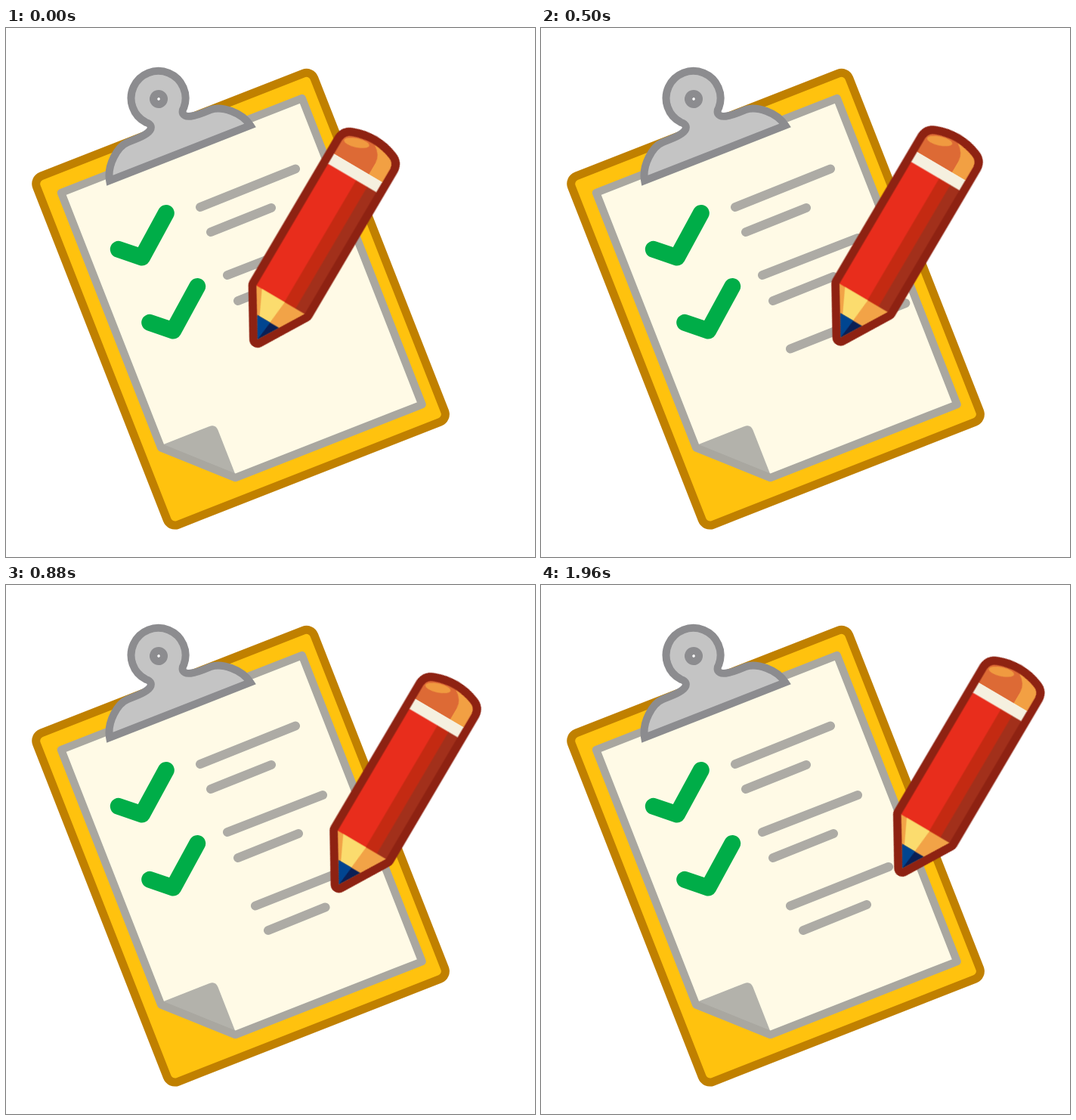
Recreate the animation shown at these times as an HTML page without scripts. Size 700 by 700 pixels, loop 2 s.

```html
<!DOCTYPE html>
<html lang="en">
<head>
<meta charset="utf-8">
<title>Checklist</title>
<style>
html, body { margin: 0; width: 100%; height: 100%; overflow: hidden; background: #fff; }
svg { display: block; width: 100vw; height: 100vh; }
.rule { fill: none; stroke: #adaba5; stroke-width: 12; stroke-linecap: round; }
.tick { fill: none; stroke: #00ad48; stroke-width: 22; stroke-linecap: round; stroke-linejoin: round; }
.long { stroke-dasharray: 174 400; animation: long 2s linear infinite; }
.short { stroke-dasharray: 84 400; animation: short 2s linear infinite; }
.pencil { animation: write 2s infinite; }

@keyframes write {
  0% { transform: translate(0, 0); animation-timing-function: cubic-bezier(.32, 0, .67, .15); }
  10.5% { transform: translate(56px, -23.5px); animation-timing-function: cubic-bezier(.33, .85, .68, 1); }
  20.833% { transform: translate(115.5px, -42.5px); animation-timing-function: cubic-bezier(.45, 0, .55, 1); }
  29% { transform: translate(17.5px, 33px); animation-timing-function: cubic-bezier(.32, 0, .67, 0); }
  37.5% { transform: translate(39.5px, 23px); animation-timing-function: cubic-bezier(.33, .4, .4, 1); }
  54.1%, 100% { transform: translate(145.3px, -37.2px); }
}
@keyframes long {
  0% { stroke-dashoffset: 173.9; opacity: 0; }
  2% { stroke-dashoffset: 150; opacity: 0; }
  2.01% { stroke-dashoffset: 150; opacity: 1; }
  10.5% { stroke-dashoffset: 45; }
  18.75%, 20.833% { stroke-dashoffset: 0; }
  29% { stroke-dashoffset: 42; }
  100% { stroke-dashoffset: 44; opacity: 1; }
}
@keyframes short {
  0%, 31% { stroke-dashoffset: 83.9; opacity: 0; }
  31.01% { stroke-dashoffset: 76; opacity: 1; }
  37.5% { stroke-dashoffset: 40; }
  45.8%, 100% { stroke-dashoffset: 0; opacity: 1; }
}
</style>
</head>
<body>
<svg viewBox="0 0 700 700">
  <!-- board, sheet and clip share one tilt -->
  <g transform="rotate(-21.4)">
    <rect x="-39" y="199.500" width="394.500" height="495.500" rx="11" fill="#ffc20e" stroke="#c08000" stroke-width="11"/>
    <path d="M-11.600 229.600H330.800V664.800H65.500L-11.600 592Z" fill="#fffae6"/>
    <path d="M-11 589H58Q67 589 67 598V664Z" fill="#b3b2ab"/>
    <path d="M-11.600 229.600H330.800V664.800H65.500L-11.600 592Z" fill="none" stroke="#a9a7a0" stroke-width="10.400" stroke-linejoin="round"/>
    <path d="M54 238C58 218 80 199.500 95 199.500H105C118 199.500 130 198 131 191Q131 187 127 184A36 36 0 1 1 180.600 184Q176.600 187 176.600 191C177.600 198 189.600 199.500 202.600 199.500H212.600C228 199.500 250 218 254 238Z" fill="#c4c4c4" stroke="#8c8c8f" stroke-width="10"/>
    <circle cx="153.800" cy="161.200" r="12" fill="#8c8c8f"/>
    <circle cx="153.800" cy="161.200" r="1.800" fill="#fff"/>
  </g>

  <path class="tick" d="M148.800 292.800L180 303.500L211.800 245"/>
  <path class="tick" d="M190.200 389.800L221.300 400.500L253.200 342"/>

  <path class="rule" d="M257 237L383 186.500M271 270L351 238M293 327L419 278M307 361L387 329"/>
  <path class="rule long" pathLength="174" d="M330 424.500L504 355.500"/>
  <path class="rule short" pathLength="84" d="M347 457L431 423"/>

  <g class="pencil">
    <g transform="rotate(30.5)">
      <path d="M458.500 125V-98Q459 -106 467 -109Q496 -120 524 -109Q532 -106 532.500 -98V125L496 186Z" fill="#8e2212" stroke="#8e2212" stroke-width="22" stroke-linejoin="round"/>
      <!-- eraser -->
      <path d="M458.500 -76V-98Q459 -106 467 -109Q496 -120 524 -109Q532 -106 532.500 -98V-76Z" fill="#dd6a35"/>
      <path d="M512 -76V-94Q512 -106 499 -114.300Q512 -113.500 524 -109Q532 -106 532.500 -98V-76Z" fill="#f2a043"/>
      <ellipse cx="477" cy="-104.500" rx="17" ry="6" transform="rotate(-18 477 -104.500)" fill="#f09a40"/>
      <path d="M458.500 -77H532.500V-61H458.500Z" fill="#f5f0df"/>
      <!-- barrel -->
      <path d="M458.500 -61.500H502V126H458.500Z" fill="#e82d1c"/>
      <path d="M501.500 -61.500H519V126H501.500Z" fill="#c42a12"/>
      <path d="M518.500 -61.500H532.500V126H518.500Z" fill="#a2301b"/>
      <!-- point -->
      <path d="M458.500 125.500H532.500L496 186Z" fill="#f2a347"/>
      <path d="M467 125.500H502L496 186Z" fill="#fbdc6e"/>
      <path d="M479.400 158.500H512.600L496 186Z" fill="#0a1f55"/>
      <path d="M479.400 158.500H499L496 186Z" fill="#004590"/>
    </g>
  </g>
</svg>
</body>
</html>
```
